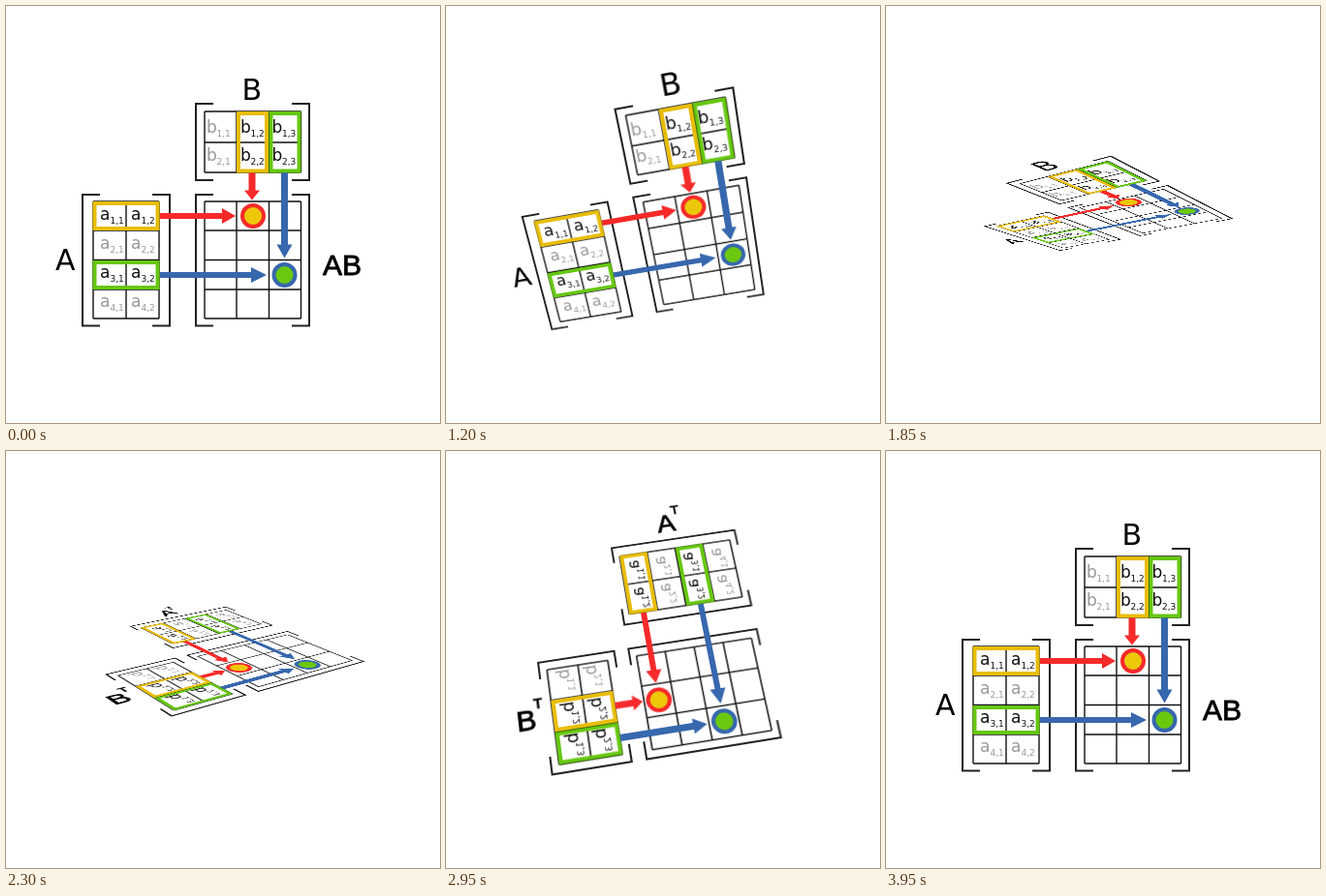
An HTML page that plays this animation: 448x431 px, repeating every 4050 ms.

```html
<!DOCTYPE html>
<html lang="en">
<head>
<meta charset="utf-8">
<title>Transpose of a matrix product</title>
<style>
  html, body { margin: 0; width: 100%; height: 100%; overflow: hidden; background: #fff; }
  #stage { position: relative; width: 448px; height: 431px; overflow: hidden; background: #fff; }
  #stage svg, #view, #rest { position: absolute; left: 0; top: 0; width: 448px; height: 431px; }
  #view { perspective: 800px; perspective-origin: 205px 210.5px; }
  #plane { transform-origin: 205px 210.5px; overflow: visible; }
  #rest { background: #fff; }
  .entry { font-family: "DejaVu Sans", sans-serif; }
  .name { font: 30px "DejaVu Sans", sans-serif; }
  .sans { font: 30px "Liberation Sans", Arial, sans-serif; }
  .sup { font-size: 15px; }
  .heavy { stroke: #000; stroke-width: .8; }
</style>
</head>
<body>
<div id="stage">
  <div id="view">
    <svg id="plane" viewBox="0 0 448 431">
      <g id="figure"></g>
      <g id="before" class="name">
        <text x="51" y="273">A</text>
        <text x="243.500" y="97">B</text>
      </g>
      <g id="after" class="sans" transform="matrix(0 1 1 0 -5.5 5.5)">
        <text x="242.500" y="75">A</text><text class="sup" x="260" y="55">T</text>
        <text x="66.500" y="271">B</text><text class="sup" x="85.500" y="250">T</text>
      </g>
    </svg>
  </div>
  <svg viewBox="0 0 448 431">
    <text id="ab" class="sans heavy" x="327" y="278">AB</text>
    <g id="ba" class="sans">
      <text x="341.500" y="275">B</text><text class="sup" x="363" y="254">T</text>
      <text x="372" y="275">A</text><text class="sup" x="393" y="254">T</text>
    </g>
  </svg>
  <div id="rest">
    <svg viewBox="0 0 448 431">
      <g id="still"></g>
      <g class="name">
        <text x="51" y="273">A</text>
        <text x="243.500" y="97">B</text>
      </g>
      <text class="sans heavy" x="327" y="278">AB</text>
    </svg>
  </div>
</div>
<script>
const $ = id => document.getElementById(id);
const YELLOW = '#e8bd08', GREEN = '#66c711', RED = '#f52a2a', BLUE = '#3767ad';

const path = (d, color, width) =>
  `<path d="${d}" fill="none" stroke="${color}" stroke-width="${width}"/>`;

function grid(xs, ys) {
  const [l, r] = [xs[0], xs[xs.length - 1]], [t, b] = [ys[0], ys[ys.length - 1]];
  return path(xs.map(x => `M${x} ${t}V${b}`).join('') +
              ys.map(y => `M${l} ${y}H${r}`).join(''), '#111', 1.4);
}

const brackets = (l, t, r, b) =>
  path(`M${l + 18} ${t}H${l}V${b}H${l + 18}M${r - 18} ${t}H${r}V${b}H${r - 18}`, '#222', 2);

const frame = (x, y, w, h, color) =>
  `<rect x="${x + 2}" y="${y + 2}" width="${w - 4}" height="${h - 4}" fill="none" stroke="${color}" stroke-width="4"/>`;

// Arrow drawn along +x, turned into place
const arrow = (x, y, turn, len, head, width, color) =>
  `<path transform="translate(${x} ${y}) rotate(${turn})" fill="${color}"
    d="M0 ${-width / 2}H${len - head}V-8L${len} 0L${len - head} 8V${width / 2}H0Z"/>`;

const dot = (x, y, fill, ring) =>
  `<circle cx="${x}" cy="${y}" r="11" fill="${fill}" stroke="${ring}" stroke-width="4"/>`;

const entry = (letter, i, j, x, y, lit) =>
  `<g class="entry" fill="${lit ? '#111' : '#999'}"><text x="${x}" y="${y}" font-size="17">${letter}</text>` +
  `<text x="${x + 10.5}" y="${y + 4}" font-size="9">${i},${j}</text></g>`;

function figure() {
  const rows = [202, 232, 262.5, 293, 323], cols = [205, 238, 271.5, 304.5];
  let s = grid(cols, [109, 141, 172]) + grid([90, 124, 158], rows) + grid(cols, rows);
  s += brackets(196, 101, 313, 180) + brackets(79, 195, 169, 330.5) + brackets(196, 195, 313, 330.5);
  s += frame(238, 109, 33, 63.5, YELLOW) + frame(271.5, 109, 33, 63.5, GREEN);
  s += frame(89.5, 202, 69, 30, YELLOW) + frame(89.5, 263, 69, 30, GREEN);
  [221, 250.5, 280.5, 311].forEach((y, i) =>
    [97, 129].forEach((x, j) => s += entry('a', i + 1, j + 1, x, y, i % 2 === 0)));
  [131, 159.5].forEach((y, i) =>
    [207, 242, 274.5].forEach((x, j) => s += entry('b', i + 1, j + 1, x, y, j > 0)));
  s += arrow(159, 217, 0, 78, 14, 6, RED) + arrow(254, 172.5, 90, 28, 10, 7, RED);
  s += arrow(159, 278, 0, 110, 16, 6, BLUE) + arrow(287.5, 172.5, 90, 88, 14, 7, BLUE);
  return s + dot(255, 217, '#edc80a', RED) + dot(287.5, 278, '#6cc80f', BLUE);
}

$('figure').innerHTML = $('still').innerHTML = figure();

const LOOP = 4050, STEP = 50, START = 915, END = 3200;
const clamp = v => Math.min(1, Math.max(0, v));

function draw(time) {
  const t = Math.floor(time % LOOP / STEP) * STEP;
  const q = clamp((t - START) / (END - START));
  const p = q - .06 * Math.sin(2 * Math.PI * q) / (2 * Math.PI);
  $('plane').style.transform = `rotateX(${-180 * p}deg) rotateZ(${-90 * p}deg)`;
  $('before').style.display = p < .5 ? '' : 'none';
  $('after').style.display = p < .5 ? 'none' : '';
  $('after').classList.toggle('heavy', p < 1);
  $('ab').style.opacity = clamp((1150 - t) / 200);
  $('ba').style.opacity = clamp((t - 3000) / 200);
  $('rest').style.opacity = t < 950 || t >= 3950 ? 1 : t >= 3850 ? .5 : 0;
}

const origin = performance.now();
function tick() {
  draw(performance.now() - origin);
  requestAnimationFrame(tick);
}
tick();
</script>
</body>
</html>
```
